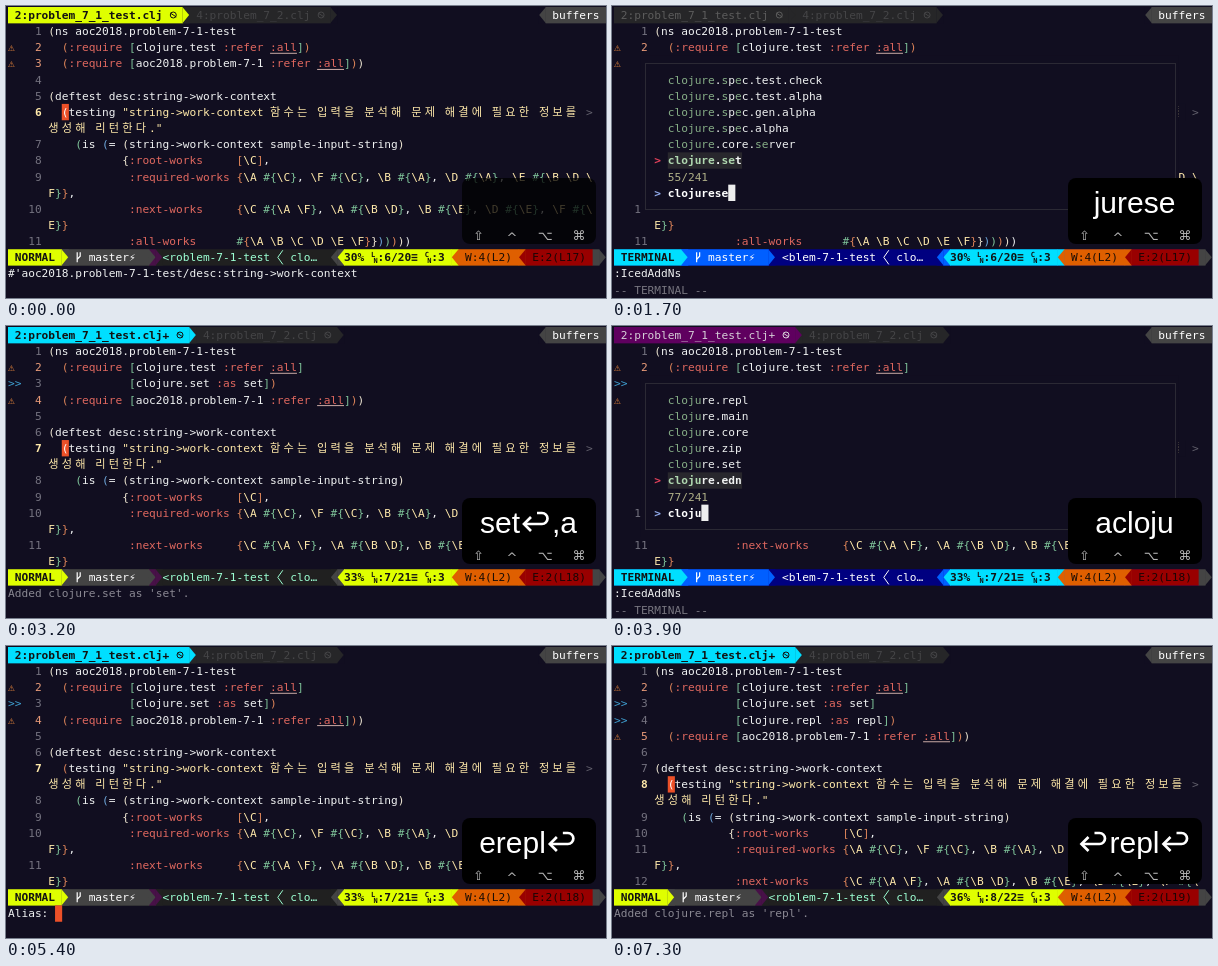
Recreate the animation shown at these times as an HTML page with a canvas. Size 600x292 px, loop 7400 ms.

```html
<!DOCTYPE html>
<html lang="en">
<head>
<meta charset="utf-8">
<title>Adding namespaces in an editor</title>
<style>
html, body { margin: 0; width: 100%; height: 100%; overflow: hidden; background: #110e20; }
canvas { display: block; width: 600px; height: 292px; }
</style>
</head>
<body>
<canvas id="stage" width="600" height="292"></canvas>
<script>
const g = document.getElementById('stage').getContext('2d');
const LOOP = 7400, CW = 6.72, RH = 16.15;
const MONO = '"DejaVu Sans Mono", "Noto Sans CJK KR", "Noto Sans CJK", "DejaVu Sans", monospace';
const SANS = '"Liberation Sans", Arial, sans-serif';
const BG = '#110e20', TEXT = '#f0f2f2', CREAM = '#ffe9aa', CORAL = '#e0685f', LIME = '#dfff00', CYAN = '#00dfff',
  GREY = '#444', DARK = '#202020', PLUM = '#5f005f', DIM = '#62606c', CURSOR = '#ec5028', AMBER = '#f08a3c';
const RAINBOW = ['#eee6d2', '#dd8459', '#7fc49a', '#6fa8dc'];

// Time of each key press
const press = (s, ...times) => times.map((t, i) => [t, s[i]]);
const KEYS = [
  ...press(',aclojureset↩', 300, 400, 700, 800, 900, 1100, 1200, 1300, 1500, 1600, 1700, 1800, 2100),
  ...press(',aclojurerepl↩', 3000, 3100, 3500, 3600, 3700, 3800, 3900, 4100, 4200, 4400, 4500, 4600, 4800, 5200),
  ...press('repl↩', 5700, 5800, 6000, 6200, 6500)
];
const typed = (from, to) => KEYS.filter(([t]) => t >= from && t <= to).map(k => k[1]).join('');

// Finder results: the last entry of each list is the selected one
const names = s => s.split(' ').map(n => 'clojure.' + n);
const SPECS = names('spec.test.check spec.test.alpha spec.gen.alpha spec.alpha core.server set');
const BASIC = names('repl main core zip set edn');
const READER = '.nrepl.inlined-deps.toolsreader.v1v3v6.clojure.tools.reader.impl.';
const REPLS = [
  '.' + READER + 'inspect', '.' + READER + 'commons',
  '..-' + READER.slice(1) + 'errors', '..r-' + READER.slice(1) + 'utils',
  '..r-nrepl.inlined-deps.toolsnamespace.v1v1v0.clojure.tools.namespace.repl', 'clojure.repl'
];
const COUNTS = { '': 241, c: 190, cl: 121, clo: 83, clojures: 61, clojurese: 55, clojureset: 12,
  clojurer: 48, clojurere: 36, clojurerer: 22, clojurerep: 9, clojurerepl: 9 };
const results = q => q.startsWith('clojures') ? SPECS : q.startsWith('clojurerep') ? REPLS : BASIC;

const px = c => 2 + c * CW, py = r => 1 + r * RH;
const width = ch => /[가-힣]/.test(ch) ? 2 : 1;

function box(c, r, n, color) {
  g.fillStyle = color;
  g.fillRect(px(c), py(r), n * CW + .4, RH + .2);
}
function put(s, c, r, color = TEXT, bold) {
  g.font = (bold ? 'bold ' : '') + '11.2px ' + MONO;
  g.fillStyle = color;
  for (const ch of s) {
    if (ch !== ' ') g.fillText(ch, px(c), py(r) + 12);
    c += width(ch);
  }
  return c;
}
function line(color, w, ...pts) {
  g.strokeStyle = color;
  g.lineWidth = w;
  g.beginPath();
  pts.forEach(([x, y]) => g.lineTo(x, y));
  g.stroke();
}
// Powerline wedge; dir 1 points right, -1 points left
function wedge(c, r, fill, back, dir = 1) {
  box(c, r, 1, back);
  const x = px(dir > 0 ? c : c + 1) - dir * .3;
  g.fillStyle = fill;
  g.beginPath();
  g.moveTo(x, py(r));
  g.lineTo(x + dir * CW, py(r) + RH / 2);
  g.lineTo(x, py(r) + RH);
  g.fill();
}
function chevron(c, r, color) {
  const x = px(c), y = py(r);
  line(color, 1, [x + 6, y + 1], [x + 1, y + RH / 2], [x + 6, y + RH - 1]);
}
function ring(c, color) {
  const x = px(c) + 4, y = py(0) + 8;
  g.strokeStyle = color;
  g.lineWidth = 1;
  g.beginPath();
  g.arc(x, y, 3, 0, 7);
  g.stroke();
  line(color, 1, [x - 3, y - 2], [x + 3, y + 2]);
}
function branch(c, r) {
  const x = px(c) + 1, y = py(r);
  line('#fff', 1.2, [x + 1, y + 3], [x + 1, y + 13]);
  line('#fff', 1.2, [x + 1, y + 10], [x + 4, y + 7], [x + 4, y + 3]);
}
function stacked(a, c, r) {
  g.font = 'bold 7px ' + MONO;
  g.fillStyle = '#111';
  g.fillText(a, px(c), py(r) + 8);
  g.fillText('N', px(c) + 2.5, py(r) + 14);
}

function source(added) {
  const extra = ['[clojure.set :as set]', '[clojure.repl :as repl]'].slice(0, added);
  const req = ['  (:require [clojure.test :refer :all]', ...extra.map(s => ' '.repeat(12) + s)];
  req[req.length - 1] += ')';
  const pad = ' '.repeat(12);
  return ['(ns aoc2018.problem-7-1-test', ...req,
    '  (:require [aoc2018.problem-7-1 :refer :all]))', '',
    '(deftest desc:string->work-context',
    '  (testing "string->work-context 함수는 입력을 분석해 문제 해결에 필요한 정보를 생성해 리턴한다."',
    '    (is (= (string->work-context sample-input-string)',
    pad.slice(1) + '{:root-works     [\\C],',
    pad + ':required-works {\\A #{\\C}, \\F #{\\C}, \\B #{\\A}, \\D #{\\A}, \\E #{\\B \\D \\F}},',
    pad + ':next-works     {\\C #{\\A \\F}, \\A #{\\B \\D}, \\B #{\\E}, \\D #{\\E}, \\F #{\\E}}',
    pad + ':all-works      #{\\A \\B \\C \\D \\E \\F}})))))'];
}

function editor(added, cursor) {
  let row = 1, depth = 0;
  const current = 6 + added;
  source(added).forEach((text, i) => {
    if (row > 14) return;
    const n = i + 1, warned = n === 2 || n === 3 + added;
    if (warned) put('⚠', 0, row, AMBER);
    else if (n > 2 && n < 3 + added) put('>>', 0, row, '#3f9fd0');
    put(String(n).padStart(3), 2, row, n === current ? CREAM : warned ? '#e79a78' : '#74727f', n === current);
    let col = 0;
    for (const tok of text.match(/"[^"]*"|\\\w|[()[\]{}]|[^\s()[\]{}"\\]+|\s+/g) || []) {
      let color = TEXT;
      if (/^["\\]/.test(tok)) color = CREAM;
      else if (tok[0] === ':') color = CORAL;
      else if (tok === '#') color = '#7fc49a';
      else if (/[([{]/.test(tok)) color = RAINBOW[depth++ % 4];
      else if (/[)\]}]/.test(tok)) color = RAINBOW[--depth % 4];
      if (cursor && n === current && col === 2 && tok === '(') {
        box(8, row, 1, CURSOR);
        color = '#fff';
      }
      if (tok === ':all') {
        const y = py(row) + 14;
        line('#c9a9a4', 1, [px(col + 6), y], [px(col + 10), y]);
      }
      for (const ch of tok) {
        const w = width(ch);
        if (col + w > 81) {
          if (w > 1) put('>', 86, row, DIM);
          col = 0;
          row++;
        }
        if (row < 15) put(ch, col + 6, row, color);
        col += w;
      }
    }
    row++;
  });
}

function tabs(added, term) {
  const name = '2:problem_7_1_test.clj' + (added ? '+' : '');
  const end = name.length + 4, rest = '#262628', faint = '#454547';
  const back = term ? (added ? PLUM : rest) : added ? CYAN : LIME;
  const ink = term ? (added ? '#d6cfd8' : '#5c5c5c') : '#111';
  box(0, 0, end, back);
  box(end, 0, 22, rest);
  put(name, 1, 0, ink, !term);
  ring(end - 2, ink);
  wedge(end, 0, back, rest);
  put('4:problem_7_2.clj', end + 2, 0, faint);
  ring(end + 20, faint);
  wedge(end + 22, 0, rest, BG);
  wedge(79, 0, GREY, BG, -1);
  box(80, 0, 9, GREY);
  put('buffers', 81, 0, '#fff');
}

function status(added, term) {
  const r = 15, mode = term ? 'TERMINAL' : 'NORMAL', m = mode.length;
  const a = term ? CYAN : LIME, b = term ? '#005fff' : GREY, c = term ? '#000080' : DARK;
  box(0, r, 87, c);
  box(0, r, m + 2, a);
  put(mode, 1, r, '#111', true);
  box(m + 2, r, 13, b);
  wedge(m + 2, r, a, b);
  branch(m + 4, r);
  put('master⚡', m + 6, r, '#fff');
  if (term) wedge(m + 15, r, b, c);
  else {
    wedge(m + 15, r, b, '#481048');
    wedge(m + 16, r, '#481048', c);
  }
  const ink = term ? '#fff' : '#9cffd3';
  put(term ? '<blem-7-1-test' : '<roblem-7-1-test', m + 17, r, ink);
  chevron(40, r, ink);
  put('clo…', 42, r, ink);
  wedge(48, r, b, c, -1);
  wedge(49, r, a, b, -1);
  box(50, r, 16, a);
  put([30, 33, 36][added] + '%', 50, r, '#111', true);
  stacked('L', 54, r);
  put(`:${6 + added}/${20 + added}≡`, 55, r, '#111', true);
  stacked('C', 62, r);
  put(':3', 63, r, '#111', true);
  wedge(66, r, '#df5f00', a, -1);
  box(67, r, 9, '#df5f00');
  put('W:4(L2)', 68, r, '#1a0d05');
  wedge(76, r, '#990000', '#df5f00', -1);
  box(77, r, 10, '#990000');
  put(`E:2(L${17 + added})`, 78, r, '#1a0505');
  box(87, r, 1, GREY);
  wedge(88, r, GREY, BG);
}

function finder(query, added) {
  g.fillStyle = BG;
  g.fillRect(px(4), py(3), 80 * CW, 10 * RH);
  box(84, 6 + added, 1, BG); // half-covered wide character
  g.strokeStyle = '#2b2934';
  g.lineWidth = 1;
  g.strokeRect(33.5, 57.5, 530, 146);
  results(query).forEach((name, i) => {
    const row = 4 + i, chosen = i === 5;
    if (chosen) {
      box(8, row, name.length, '#28272d');
      put('>', 6, row, '#e0405a', true);
    }
    const start = name.indexOf('clojure');
    let k = 0;
    [...name].forEach((ch, j) => {
      const hit = j >= start && ch === query[k];
      if (hit) k++;
      put(ch, 8 + j, row, hit ? (chosen ? '#afd7af' : '#87af87') : TEXT, chosen);
    });
  });
  put((COUNTS[query] || 77) + '/241', 8, 10, '#afaf87');
  put('>', 6, 11, '#8fa8e8', true);
  box(put(query, 8, 11, '#fff', true), 11, 1, '#eee');
}

function returnKey(x) {
  const y = 205;
  g.strokeStyle = '#fff';
  g.lineWidth = 2.7;
  g.beginPath();
  g.moveTo(x + 17, y - 18);
  g.lineTo(x + 22, y - 18);
  g.arc(x + 22, y - 12.5, 5.5, -Math.PI / 2, Math.PI / 2);
  g.lineTo(x + 4, y - 7);
  g.stroke();
  line('#fff', 2.7, [x + 11, y - 14], [x + 4, y - 7], [x + 11, y]);
}
function keycast(t) {
  const s = typed(0, t).slice(-6);
  g.fillStyle = s ? '#000' : 'rgba(0,0,0,.75)';
  g.beginPath();
  g.roundRect(456, 172, 134, 66, 8);
  g.fill();
  g.font = '13px "DejaVu Sans", sans-serif';
  g.fillStyle = '#b4b4b4';
  g.textAlign = 'center';
  ['⇧', '^', '⌥', '⌘'].forEach((k, i) => g.fillText(k, 472.5 + i * 33.4, k === '^' ? 236 : 233.5));
  g.textAlign = 'left';
  g.font = '30px ' + SANS;
  g.fillStyle = '#fff';
  const size = ch => ch === '↩' ? 32 : g.measureText(ch).width;
  let x = 522.5 - [...s].reduce((sum, ch) => sum + size(ch), 0) / 2;
  for (const ch of s) {
    if (ch === '↩') returnKey(x);
    else g.fillText(ch, x, 207);
    x += size(ch);
  }
}

function prompt(t, term, alias) {
  if (term) {
    put(':IcedAddNs', 0, 16);
    put('-- TERMINAL --', 0, 17, '#77757f');
  } else if (alias) {
    box(put('Alias: ' + typed(5300, t), 0, 16), 16, 1, CURSOR);
  } else if (t < 500) put("#'aoc2018.problem-7-1-test/desc:string->work-context", 0, 16);
  else if (t >= 6700) put("Added clojure.repl as 'repl'.", 0, 16, '#8a8892');
  else if (t >= 2300 && t < 3300) put("Added clojure.set as 'set'.", 0, 16, '#8a8892');
}

function draw(now) {
  const t = Math.floor(now % LOOP / 100) * 100;
  const added = t >= 6600 ? 2 : t >= 2200 ? 1 : 0;
  const opened = t >= 500 && t < 2100 ? 500 : t >= 3300 && t < 5200 ? 3300 : 0;
  const term = opened > 0, alias = t >= 5300 && t < 6500;
  g.fillStyle = BG;
  g.fillRect(0, 0, 600, 292);
  editor(added, !term && !alias);
  tabs(added, term);
  if (term) finder(typed(opened, t), added);
  status(added, term);
  prompt(t, term, alias);
  keycast(t);
}

const began = performance.now();
function tick() {
  draw(performance.now() - began);
  requestAnimationFrame(tick);
}
tick();
</script>
</body>
</html>
```
